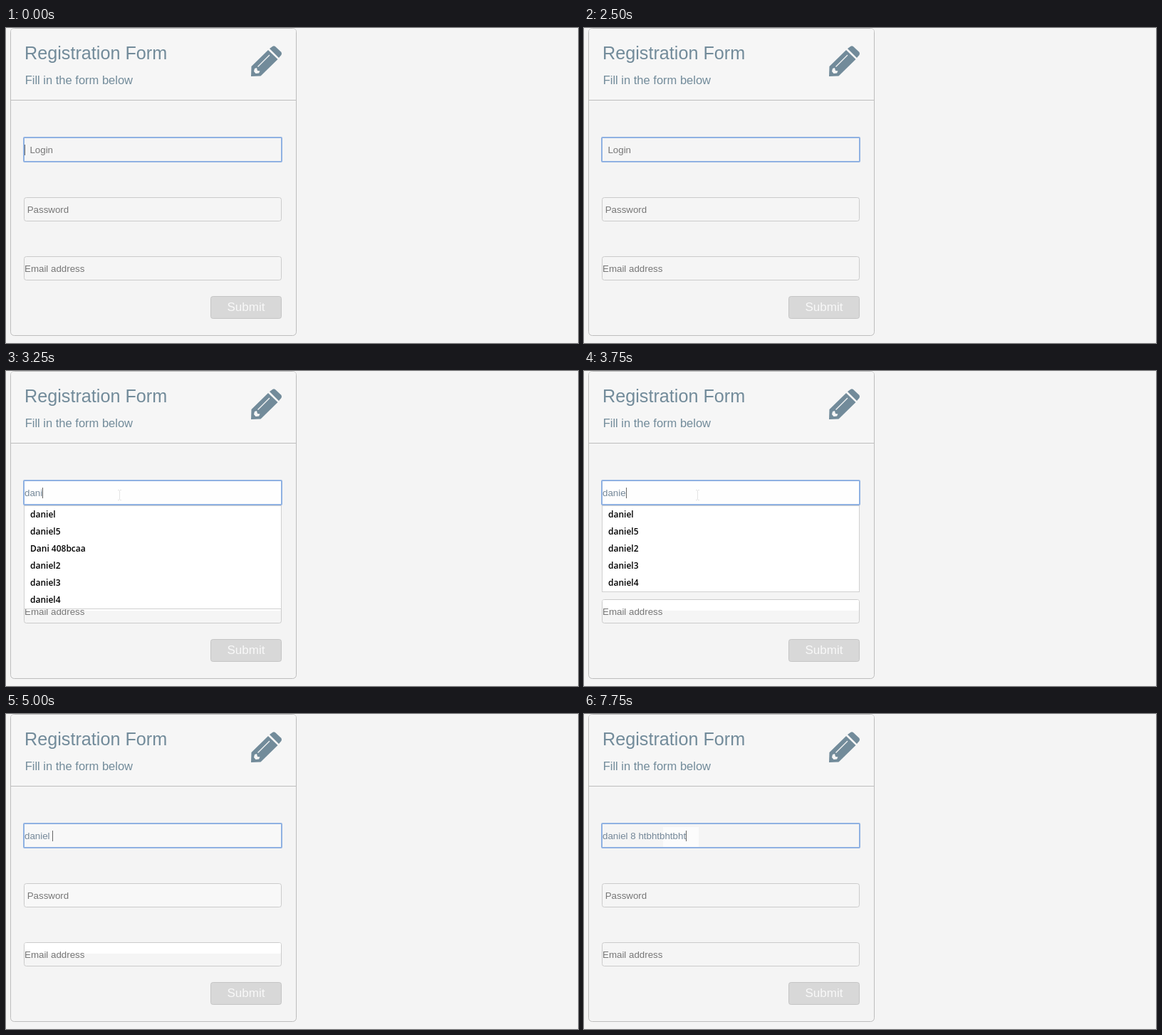
An HTML page that plays this animation: 803x443 px, repeating every 8000 ms.

```html
<!DOCTYPE html>
<html lang="en">
<head>
<meta charset="utf-8">
<title>Registration form</title>
<style>
  html, body { margin: 0; width: 100%; height: 100%; overflow: hidden; background: #f4f4f4; }
  svg { display: block; font: 13.333px "Liberation Sans", Arial, sans-serif; }
  text { white-space: pre; }
  .slate { fill: #728b9a; }
  .hint { fill: #777; }
  .box { fill: #f5f5f5; stroke: #cbcbcb; }
  #list text { font: 600 12px "Open Sans", "Noto Sans", sans-serif; fill: #000; }
</style>
</head>
<body>
<svg width="803" height="443" viewBox="0 0 803 443">
  <rect width="803" height="443" fill="#f4f4f4"/>
  <rect x="6.5" y=".5" width="401" height="432" rx="5" fill="#f4f4f4" stroke="#bdbdbd"/>
  <path d="M7 101V5q0-4 4-4h392q4 0 4 4v96z" fill="#f6f6f6"/>
  <path d="M7 101.5H407" stroke="#bdbdbd"/>
  <text class="slate" x="26" y="44" font-size="25.2">Registration Form</text>
  <text class="slate" x="26.7" y="79" font-size="16.5">Fill in the form below</text>

  <g class="slate">
    <path d="M344 68 344.5 54 368 31 381.5 44 357.5 67.5z"/>
    <path d="M370 29 374 26Q376 24.5 378 26L386 33.5Q388 36 386 38.5L383 42z"/>
    <path d="M349 57 352 56 353 60 356.5 60.5 355 63.5 350.5 64 348 61z" fill="#f6f6f6"/>
    <path d="M353.5 54.5 370 38" stroke="#f6f6f6" stroke-width="1.3"/>
  </g>

  <rect id="login" x="25" y="154" width="362" height="34" rx="1" stroke="#8fb1e2" stroke-width="2"/>
  <rect id="patch" y="159" height="28" fill="#fcfcfc"/>
  <rect id="password" class="box" x="25.5" y="238.5" width="361" height="33" rx="3"/>
  <rect class="box" x="25.5" y="321.5" width="361" height="33" rx="3"/>
  <rect id="band" x="26" y="322" width="360" height="15" rx="2" fill="#fff"/>

  <text id="loginHint" class="hint" x="33.4" y="176">Login</text>
  <text class="hint" x="29.7" y="260">Password</text>
  <text class="hint" x="26" y="343">Email address</text>
  <text id="typed" x="26" y="176" fill="#748798"></text>
  <rect id="caret" y="164" width="1" height="15" fill="#666"/>
  <path id="beam" d="M157 167.5h2m1 0h2M159.5 168v13M157 181.5h2m1 0h2" fill="none" stroke="#e4e4e4"/>

  <rect x="287.5" y="377.5" width="99" height="31" rx="3" fill="#d8d8d8" stroke="#c5c5c5"/>
  <text x="337" y="398" font-size="17" text-anchor="middle" fill="#f8f8f8">Submit</text>
  <g id="list"></g>
</svg>
<script>
const $ = id => document.getElementById(id);
const LOOP = 8000;

// time, login text, caret visible
const steps = [
  [0, '', 1], [500, '', 0], [750, '', 1], [1500, '', 0], [2000, '', 1], [2500, '', 0],
  [2750, 'd', 1], [3000, 'dan', 1], [3250, 'dani', 1], [3750, 'danie', 1],
  [4000, 'daniel', 1], [4500, 'daniel', 0], [5000, 'daniel ', 1], [5250, 'daniel 8', 1],
  [6000, 'daniel 8 ', 1], [6500, 'daniel 8 ht', 1], [6750, 'daniel 8 htb', 1],
  [7500, 'daniel 8 htbhtb', 1], [7750, 'daniel 8 htbhtbhtbht', 1]
];
const names = ['daniel', 'daniel5', 'Dani 408bcaa', 'daniel2', 'daniel3', 'daniel4'];

const show = (id, on) => $(id).setAttribute('visibility', on ? 'visible' : 'hidden');
const fill = (id, color) => { $(id).style.fill = color; };

function suggestions(t) {
  if (t < 2750 || t >= 5000) return [];
  if (t < 3000) return [...names].reverse();
  return t < 3750 ? names : names.filter(n => n[0] === 'd');
}

function drawList(items) {
  const rows = items.map((n, i) => `<text x="34" y="${206 + 24 * i}">${n}</text>`).join('');
  $('list').innerHTML = items.length &&
    `<rect x="25.5" y="189.5" width="361" height="${24 * items.length + 1}" fill="#fff" stroke="#d0d0d0"/>${rows}`;
  if (!items.length) $('list').textContent = '';
}

function drawPatch(t) {
  const [x, w] = t >= 7750 ? [111, 50] : t >= 6750 && t < 7500 ? [64, 49] : [0, 0];
  $('patch').setAttribute('x', x);
  $('patch').setAttribute('width', w);
}

function draw(step) {
  const [t, text, caret] = step;
  const open = t >= 2750 && t < 5000;
  const pale = t >= 5000 && t < 7500;
  $('typed').textContent = text;
  $('caret').setAttribute('x', Math.round(26 + (text ? $('typed').getComputedTextLength() : 0)));
  show('caret', caret);
  show('loginHint', !text);
  show('beam', open);
  show('band', t >= 2750 && t < 7500);
  fill('login', open ? '#fefefe' : pale ? '#f8f8f8' : '#f5f5f5');
  fill('password', pale ? '#f8f8f8' : '#f5f5f5');
  drawPatch(t);
  drawList(suggestions(t));
}

let current;
function tick() {
  const t = performance.now() % LOOP;
  const step = steps.findLast(s => s[0] <= t);
  if (step !== current) draw(current = step);
  requestAnimationFrame(tick);
}
tick();
</script>
</body>
</html>
```
